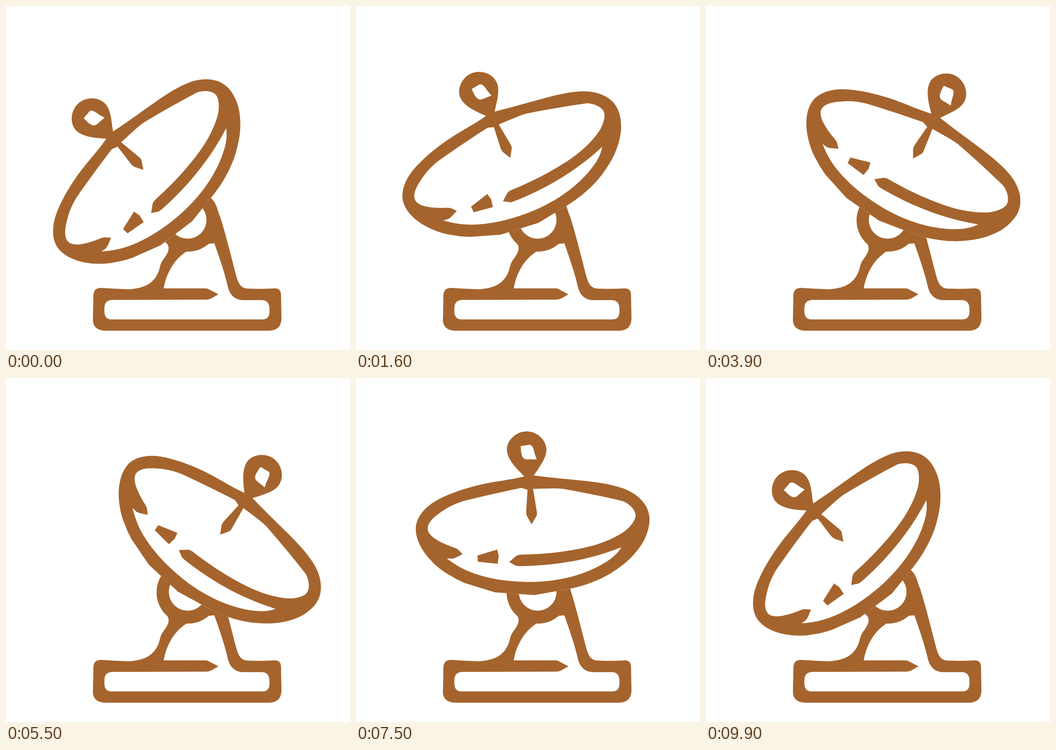
These frames come from a looping animation (748x748 px, 10 s). An HTML page:

```html
<!DOCTYPE html>
<html lang="en">
<head>
<meta charset="utf-8">
<title>Satellite dish</title>
<style>
  html, body { margin: 0; height: 100%; overflow: hidden; background: #fff; }
  svg { display: block; width: 100%; height: 100%; fill: #a5642d; fill-rule: evenodd; }
</style>
</head>
<body>
<svg viewBox="0 0 748 748">
  <!-- stand: outline, inner opening, bearing hole -->
  <path d="M446 418C457 428 459 440 463 452Q466 458 468 466C481 508 492 555 501 588C506 606 512 614 526 614.500Q555 615.500 584 614C594 614 598 619 598 629L599 680C598 696 591 705 573 706H215C198 705 189 697 189 682L190 633C190 618 195 613 208 613Q240 615 266 616C309 614 325 597 333 574C337 560 336 559 345 547C352 537 356 528 352 520C351 516 347 515 345 512A69 69 0 0 1 446 418Z
    M343 614H434Q439 614 443 617L462 627L446 636Q440 638.500 435 638.500L233 639C220 639 214 645 214 657C213 669 215 681.500 229 681.500H558C570 681 573 674 573 662C573 650 571 640 556 639.500H518C499 640 488 630 483 613C476 581 464 547 453 516L441 517C430 526 415 535 392 534C362 554 348 585 343 614Z
    M354 465a41 41 0 1 0 82 0a41 41 0 1 0 -82 0Z"/>
  <g id="dish">
    <path id="shell" fill="#fff"/>
    <path id="frame"/>
    <path d="M264 386L307 373L310.500 387L308 404L265 399.500Z"/>
  </g>
</svg>
<script>
const $ = id => document.getElementById(id);

const shell = `M366 214C334 222 300 225 270 232C236 240 200 252 174 267
  C150 281 130 303 130 328C130 344 136 360 147 377C157 392 178 415 204 429
  Q220 439 237 446L302 466L388 472L466 458C500 451 530 439 555 424
  C572 413 587 402 599 389.500C613 375 627 356 633 337C637 325 639 312 638 303
  C637 290 632 279 623 268C612 255 597 246 581 240C545 227 500 224 450 219
  C427 217 405 214 387 212C397 195 415 175 414 154C412 132 392 116 370 116
  C347 117 328 136 328 156C329 178 350 198 366 214Z`;

const bowl = `M360 239L373 243L370 291Q370 297 372 301L382 318L393 299
  Q394 296 393 290L385 241L430 240Q440 240 450 241C495 249 540 258 581 268
  C595 274 608 287 608 299C608 309 597 323 585 332.500C561 350 525 364 485 371.500
  C445 379 410 383 360 384Q352 384 347 388L333 400L347 408Q350 409 360 409
  C440 408 515 393 577 368C571 378 565 384 554 393C510 425 445 444 375 443.500
  C330 443 290 437 254 424C232 416 214 405 197 392L209 393Q214 392 218 390
  L232 383L222 373Q218 370 208 367C195 362 180 356 167 346
  C159 339 155 332 156 326C157 312 172 300 190 288C203 279 217 273 232 268
  C275 257 320 247 360 239Z`;

const eye = `M358 148L372 146C382 143 384 148 387 158Q389 168 393 177
  L372 177C360 177 359 165 358 148Z`;

$('shell').setAttribute('d', shell);
$('frame').setAttribute('d', shell + bowl + eye);

const LOOP = 10000, STEP = 100, SWING = 82.2;

function draw(now) {
  const t = Math.floor((now + 20) / STEP) * STEP % LOOP;
  const p = 1 - Math.abs(1 - t / (LOOP / 2));   // out and back
  const ease = p * p * (3 - 2 * p);
  $('dish').setAttribute('transform', `rotate(${SWING * (ease - 0.5)} 391.4 448.2)`);
  requestAnimationFrame(draw);
}
draw(performance.now());
</script>
</body>
</html>
```
